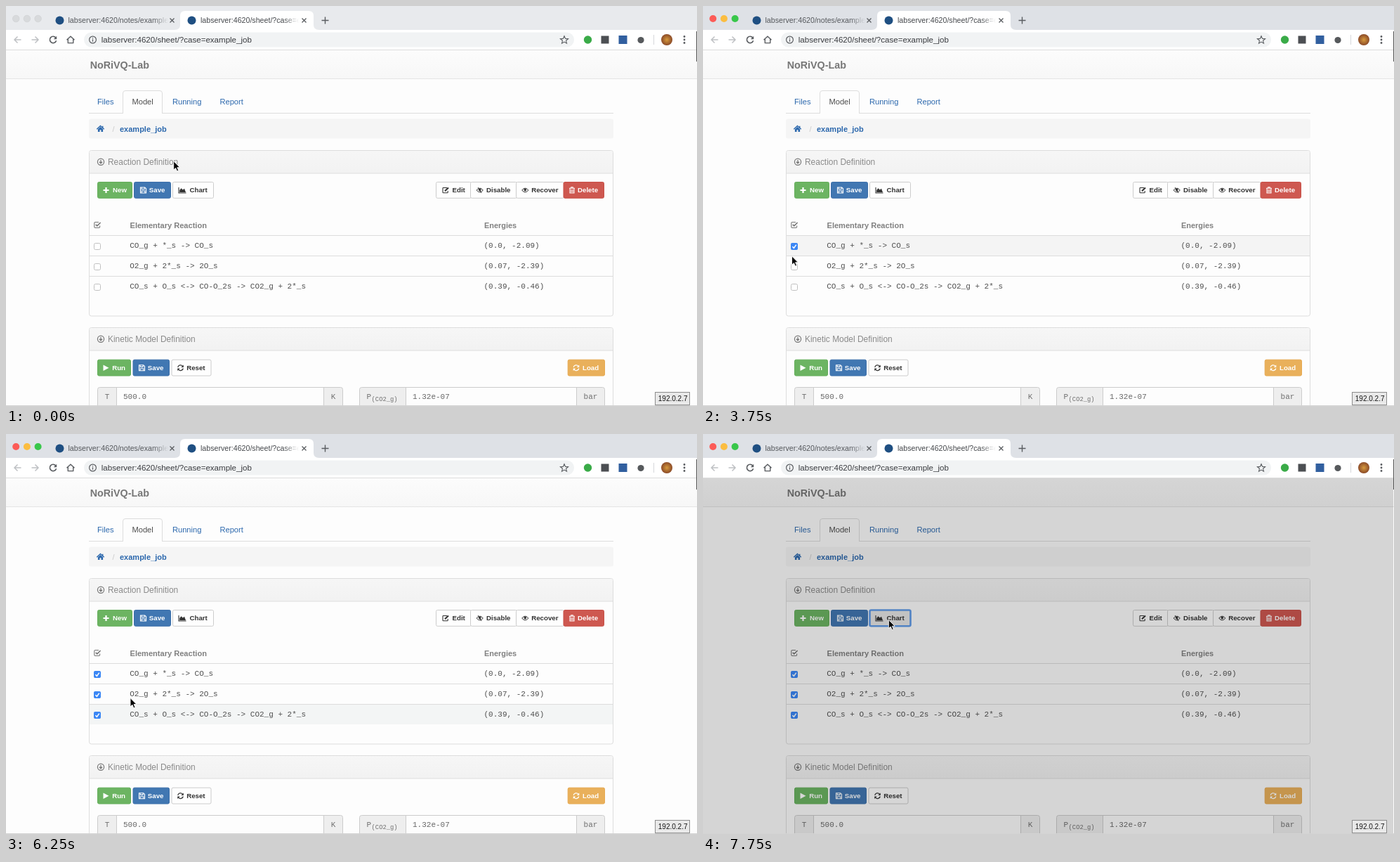
An HTML page that plays this animation: 984 px wide and 569 px high, repeating every 8 s.

```html
<!DOCTYPE html>
<html lang="en">
<head>
<meta charset="utf-8">
<title>Reaction model</title>
<style>
html, body { margin: 0; width: 100%; height: 100%; overflow: hidden; background: #fdfdfd; }
svg { display: block; width: 100%; height: 100%; }
text { font-family: "Liberation Sans", Arial, sans-serif; white-space: pre; }
.mono { font-family: "Liberation Mono", "Courier New", monospace; }
</style>
</head>
<body>
<svg id="stage" viewBox="0 0 984 569"></svg>
<script>
const LOOP = 8000;
const stage = document.getElementById('stage');
const BLUE = '#2c68ad', LINE = '#dddddd', INK = '#333', CODE = '#505050';

const rect = (x, y, w, h, fill, extra = '') =>
  `<rect x="${x}" y="${y}" width="${w}" height="${h}" fill="${fill}" ${extra}/>`;
const disc = (x, y, r, fill, extra = '') =>
  `<circle cx="${x}" cy="${y}" r="${r}" fill="${fill}" ${extra}/>`;
const path = (d, stroke, width = 1.2, fill = 'none', extra = '') =>
  `<path d="${d}" fill="${fill}" stroke="${stroke}" stroke-width="${width}" ${extra}/>`;
const text = (x, y, size, fill, str, extra = '') =>
  `<text x="${x}" y="${y}" font-size="${size}" fill="${fill}" ${extra}>${str.replace(/</g, '&lt;')}</text>`;
const mono = (x, y, str, fill = CODE, extra = '') => text(x, y, 11, fill, str, `class="mono" ${extra}`);
const bold = (x, y, size, fill, str) => text(x, y, size, fill, str, 'font-weight="700"');
const at = (x, y, body) => `<g transform="translate(${x} ${y})">${body}</g>`;
const hline = (x1, x2, y, color = LINE) => path(`M${x1} ${y}H${x2}`, color, 1);

// Small glyphs, centred on 0,0
const icons = {
  plus: c => path('M-4 0H4M0 -4V4', c, 2.2),
  save: c => path('M-4 -4H2.2L4 -2.2V4H-4ZM-2.3 -4V-1.3H1.6V-4M-2.3 4V1H2.3V4', c, 1.1),
  chart: c => path('M-5 -4V4H5.5', c, 1.1) + path('M-3.8 3V0L-1.5 -2.8L.8 -.6L3 -2.2L5 3Z', 'none', 0, c),
  edit: c => path('M2 -3.5H-3.2Q-4 -3.5 -4 -2.7V3Q-4 3.8 -3.2 3.8H2.4Q3.2 3.8 3.2 3V1', c, 1.1) +
    path('M-1 1.2L4 -3.6', c, 2.1),
  eye: c => path('M-4.6 0Q0 -5.6 4.6 0Q0 5.6 -4.6 0Z', c, 1) + disc(0, -.4, 1.8, c),
  hidden: c => icons.eye(c) + path('M-2.6 -4L2.4 4', c, 1),
  trash: c => path('M-4 -2.8H4M-1.3 -3V-4.2H1.3V-3', c, 1.1) +
    path('M-3 -2.4V4H3V-2.4M-1.1 -1V3M1.1 -1V3', c, 1.1),
  play: c => path('M-3.5 -4.3L4.5 0L-3.5 4.3Z', 'none', 0, c),
  refresh: c => path('M-3.8 -.8A3.9 3.9 0 0 1 3 -2.5M3.8 .8A3.9 3.9 0 0 1 -3 2.5', c, 1.3) +
    path('M4.3 -4.3V-.8H.8ZM-4.3 4.3V.8H-.8Z', 'none', 0, c),
  down: c => disc(0, 0, 4.6, 'none', `stroke="${c}" stroke-width="1.2"`) +
    path('M0 -2.6V2M-2.1 0L0 2.1L2.1 0', c, 1.3),
  home: c => path('M-5.2 .4L0 -4.4L5.2 .4M3.2 -4V-1.5', c, 1.4) +
    path('M-3.6 .5L0 -2.7L3.6 .5V4.2H1V1.5H-1V4.2H-3.6Z', 'none', 0, c),
  ticked: c => path('M2 -4H-3Q-4.2 -4 -4.2 -2.8V2.8Q-4.2 4 -3 4H2.4Q3.6 4 3.6 2.8V1', c, 1.1) +
    path('M-2.2 -.6L-.3 1.4L4.6 -3.5', c, 1.6),
  close: c => path('M-3 -3L3 3M3 -3L-3 3', c, 1.3)
};
const icon = (name, x, y, color) => at(x, y, icons[name](color));

const BUTTON_H = 23.8;
function button(x, y, w, fill, edge, ink, glyph, gx, label, tx) {
  return rect(x + .5, y + .5, w - 1, BUTTON_H - 1, fill, `stroke="${edge}" rx="2"`) +
    icon(glyph, gx, y + 12, ink) + bold(tx, y + 15.4, 9.7, ink, label);
}
const green = (x, y, w, ...rest) => button(x, y, w, '#6cb462', '#64ae5b', '#fff', ...rest);
const blue = (x, y, w, ...rest) => button(x, y, w, '#4177b2', '#3d70aa', '#fff', ...rest);
const red = (x, y, w, ...rest) => button(x, y, w, '#ce5850', '#c85048', '#fff', ...rest);
const amber = (x, y, w, ...rest) => button(x, y, w, '#e9b05b', '#e6a950', '#fff', ...rest);
const plain = (x, y, w, ...rest) => button(x, y, w, '#fefefe', '#cccccc', INK, ...rest);

function browser() {
  const dark = '#5a5d61', pale = '#bfc1c4';
  const tabLabel = (x, str, fade) => text(x, 24, 10.65, `url(#${fade})`, str);
  return `<rect id="strip" width="984" height="34"/>` +
    '<g id="lights"></g>' +
    path('M240 34Q248 34 248 27V14Q248 7 255 7H431Q438 7 438 14V27Q438 34 446 34Z', 'none', 0, '#fff') +
    rect(0, 34, 984, 29, '#fff') +
    disc(76.5, 20.5, 6, '#1f4f82') + disc(264.5, 20.5, 6, '#1f4f82') +
    tabLabel(88.5, 'labserver:4620/notes/example', 'fadeA') +
    tabLabel(277, 'labserver:4620/sheet/?case=e', 'fadeB') +
    icon('close', 236.5, 20.5, dark) + icon('close', 424.5, 20.5, dark) +
    path('M449.5 20.5H459.5M454.5 15.5V25.5', dark, 1.4) +
    path('M21.5 48H12M16.5 43.5L12 48L16.5 52.5', pale, 1.5) +
    path('M36.5 48H46M41.5 43.5L46 48L41.5 52.5', pale, 1.5) +
    path('M70.8 45A4.7 4.7 0 1 0 71.6 49.3', dark, 1.6) + path('M72.2 42.8V47.2H67.8Z', 'none', 0, dark) +
    path('M86.5 48.3L92 43.2L97.5 48.3M88.3 47V52.6H95.7V47', dark, 1.4) +
    rect(111, 37.5, 698, 21, '#f1f3f4', 'rx="10.5"') +
    disc(123.5, 48, 4.9, 'none', `stroke="${dark}" stroke-width="1.2"`) +
    path('M123.5 47.2V50.7M123.5 45V46.2', dark, 1.2) +
    text(135.8, 52, 11.55, '#393b3f', 'labserver:4620/sheet/?case=example_job') +
    path('M795 42.7L796.6 46.4L800.6 46.7L797.5 49.3L798.5 53.2L795 51.1L791.5 53.2L792.5 49.3L789.4 46.7L793.4 46.4Z', dark, 1.1) +
    disc(828.5, 48, 5.7, '#3aab48') + rect(847.5, 42.5, 11, 11, '#4c4f53') +
    rect(872.5, 42, 12, 12, '#315f9f') + disc(904, 48.5, 4.6, '#56595c') +
    path('M922.5 41V55', '#d6d8db', 1) + disc(941, 48, 8, 'url(#avatar)') +
    [43.5, 48, 52.5].map(y => disc(966, y, 1.4, dark)).join('') +
    hline(0, 984, 62.5, '#dcdcdc');
}

function panel(y, h, title) {
  return rect(118.5, y + .5, 746, h, '#fdfdfd', `stroke="${LINE}" rx="3"`) +
    path(`M119 ${y + 33}V${y + 4}Q119 ${y + 1} 122 ${y + 1}H861Q864 ${y + 1} 864 ${y + 4}V${y + 33}Z`, 'none', 0, 'url(#head)') +
    hline(119, 864, y + 33) + icon('down', 135, y + 16.7, '#777') +
    text(145, y + 21, 11.95, '#8a8a8a', title);
}

const rows = [
  ['CO_g + *_s -> CO_s', '(0.0, -2.09)'],
  ['O2_g + 2*_s -> 2O_s', '(0.07, -2.39)'],
  ['CO_s + O_s <-> CO-O_2s -> CO2_g + 2*_s', '(0.39, -0.46)']
];

function table() {
  const body = rows.map(([reaction, energy], i) => {
    const y = 326 + 29 * i;
    return rect(119, y + 1, 745, 28, i < 2 ? '#f4f4f4' : '#f3f5f5', `id="hover${i}"`) +
      hline(119, 864, y + .5) +
      rect(125.5, y + 11.5, 9, 9, '#fff', 'rx="2" stroke="#c0c0c0"') +
      `<g id="tick${i}">` + rect(125, y + 11, 10, 10, '#3b87f5', 'rx="2"') +
      path(`M127.4 ${y + 16.2}L129.4 ${y + 18.3}L132.8 ${y + 13.6}`, '#fff', 1.5) + '</g>' +
      mono(176.2, y + 18.3, reaction) + mono(680.5, y + 18.3, energy);
  }).join('');
  return icon('ticked', 130, 311.5, '#777') + bold(176.5, 315.5, 11.07, '#808080', 'Elementary Reaction') +
    bold(681, 315.5, 10.95, '#808080', 'Energies') + body;
}

function field(x, widths, label, value, unit) {
  const [a, b, c] = widths, y = 542.5, edge = 'stroke="#cccccc"', gray = '#707070';
  return rect(x, y, a + b + c, 40, '#eeeeee', `${edge} rx="3"`) +
    rect(x + a, y, b, 40, '#fdfdfd', edge) + label +
    mono(x + a + 9.5, 559, value, '#686868') +
    mono(x + a + b + c / 2, 559, unit, gray, 'text-anchor="middle"');
}

function page() {
  const tab = (x, str, color = BLUE) => text(x, 140, 11.1, color, str);
  return rect(0, 63, 984, 506, '#fdfdfd') + rect(0, 63, 984, 41, 'url(#nav)') + hline(0, 984, 103.5, '#e4e4e4') +
    bold(119.7, 89, 14.3, '#777', 'NoRiVQ-Lab') +
    hline(118, 865, 152.5) +
    path('M166.5 153V124Q166.5 120.5 170 120.5H219Q222.5 120.5 222.5 124V153', LINE, 1, '#fdfdfd') +
    tab(130, 'Files') + tab(179.5, 'Model', '#4c4c4c') + tab(237, 'Running') + tab(304.5, 'Report') +
    rect(118, 160.5, 747, 28, '#f5f5f5', 'rx="3"') + icon('home', 134.5, 174.8, BLUE) +
    text(151.5, 178.6, 11, '#ccc', '/') + bold(162, 178.6, 11, BLUE, 'example_job') +
    panel(205, 235.5, 'Reaction Definition') +
    green(130, 250, 50, 'plus', 142.5, 'New', 152) +
    blue(182, 250, 53, 'save', 195.5, 'Save', 203.8) +
    rect(237.5, 250.5, 58, 22.8, '#fefefe', 'id="chart" rx="2"') +
    icon('chart', 251, 262, INK) + bold(261.5, 265.4, 9.7, INK, 'Chart') +
    plain(612, 250, 51, 'edit', 626, 'Edit', 635.5) +
    plain(661, 250, 67, 'hidden', 674.7, 'Disable', 684) +
    plain(726, 250, 69, 'eye', 739.3, 'Recover', 748.2) +
    red(793.5, 250, 58.5, 'trash', 806, 'Delete', 814) +
    table() +
    panel(457, 140, 'Kinetic Model Definition') +
    green(130, 502.7, 48, 'play', 142, 'Run', 151.2) +
    blue(180.5, 502.7, 52.5, 'save', 193.5, 'Save', 201.8) +
    plain(235.5, 502.7, 57, 'refresh', 248.5, 'Reset', 257.2) +
    amber(799.7, 502.7, 53.3, 'refresh', 812, 'Load', 821) +
    field(130.5, [27, 295, 27], mono(140.7, 559, 'T', '#707070'), '500.0', 'K') +
    field(503.5, [66, 243, 40],
      mono(513.5, 559, 'P', '#707070') + text(520.6, 562.3, 8.8, '#707070', '(CO2_g)', 'class="mono"'), '1.32e-07', 'bar');
}

stage.innerHTML = `<defs>
  <linearGradient id="nav" x2="0" y2="1"><stop stop-color="#fcfcfc"/><stop offset="1" stop-color="#f7f7f7"/></linearGradient>
  <linearGradient id="head" x2="0" y2="1"><stop stop-color="#f6f6f6"/><stop offset="1" stop-color="#f2f2f2"/></linearGradient>
  <linearGradient id="fadeA" gradientUnits="userSpaceOnUse" x1="210" x2="231"><stop stop-color="#55585c"/><stop offset="1" stop-color="#55585c" stop-opacity="0"/></linearGradient>
  <linearGradient id="fadeB" gradientUnits="userSpaceOnUse" x1="396" x2="417"><stop stop-color="#45484c"/><stop offset="1" stop-color="#45484c" stop-opacity="0"/></linearGradient>
  <radialGradient id="avatar"><stop stop-color="#d79a3d"/><stop offset="1" stop-color="#8b4a27"/></radialGradient>
  </defs>` + page() + browser() +
  rect(0, 63, 983, 505, '#000', 'id="shade" opacity=".155"') +
  hline(0, 984, 568.5, '#d3d3d3') + rect(983, 36, 1, 43, '#555') +
  rect(924.5, 549.5, 49, 18, '#e9e9e9', 'stroke="#8c8c8c"') +
  text(928.8, 562.3, 10, '#161616', '192.0.2.7') +
  `<g id="cursor">${path('M0 0V12.4L2.9 9.8L4.9 14.3L7 13.4L5.1 9H8.9Z', '#fff', .9, '#050505')}</g>`;

const el = id => document.getElementById(id);
const show = (id, on) => el(id).setAttribute('visibility', on ? 'visible' : 'hidden');
const put = (id, attrs) => Object.entries(attrs).forEach(([k, v]) => el(id).setAttribute(k, v));

// Pointer stops: start time, x, y
const stops = [
  [0, 238.7, 220.7], [500, 223.5, 224], [750, 160, 288.5], [1000, 142.5, 309.5], [1250, 117.5, 338.5],
  [1500, 125.5, 340.5], [1750, 127, 342], [3750, 126.5, 355.8], [4000, 125.5, 370], [5000, 125, 395],
  [5250, 124.5, 399.5], [6250, 177, 375.5], [6500, 227.5, 313.5], [6750, 247.5, 288],
  [7000, 261.5, 266], [7250, 264.3, 264.3]
];
const hovers = [[2250, 4000], [4000, 5000], [5000, 6500]];
const ticks = [3000, 4750, 5750];

function draw(t) {
  const [, x, y] = stops.findLast(s => s[0] <= t);
  put('cursor', { transform: `translate(${x} ${y})` });

  const active = t >= 2250;
  put('strip', { fill: active ? '#dee1e6' : '#e8eaed' });
  el('lights').innerHTML = ['#fc5b57', '#fbbd40', '#38c74a'].map((c, i) =>
    disc(14.2 + 15.7 * i, 18, active ? 5 : 4.8, active ? c : '#d8dadc',
      active ? '' : 'stroke="#cdcfd1" stroke-width=".6"')).join('');

  hovers.forEach(([from, to], i) => show('hover' + i, t >= from && t < to));
  ticks.forEach((from, i) => show('tick' + i, t >= from));

  const over = t >= 7000, focus = t >= 7750;
  put('chart', {
    fill: over ? '#e6e6e6' : '#fefefe',
    stroke: focus ? '#609be8' : over ? '#adadad' : '#cccccc',
    'stroke-width': focus ? 2.6 : 1
  });
  show('shade', focus);
}

function tick(now) {
  draw(now % LOOP);
  requestAnimationFrame(tick);
}
draw(0);
requestAnimationFrame(tick);
</script>
</body>
</html>
```
